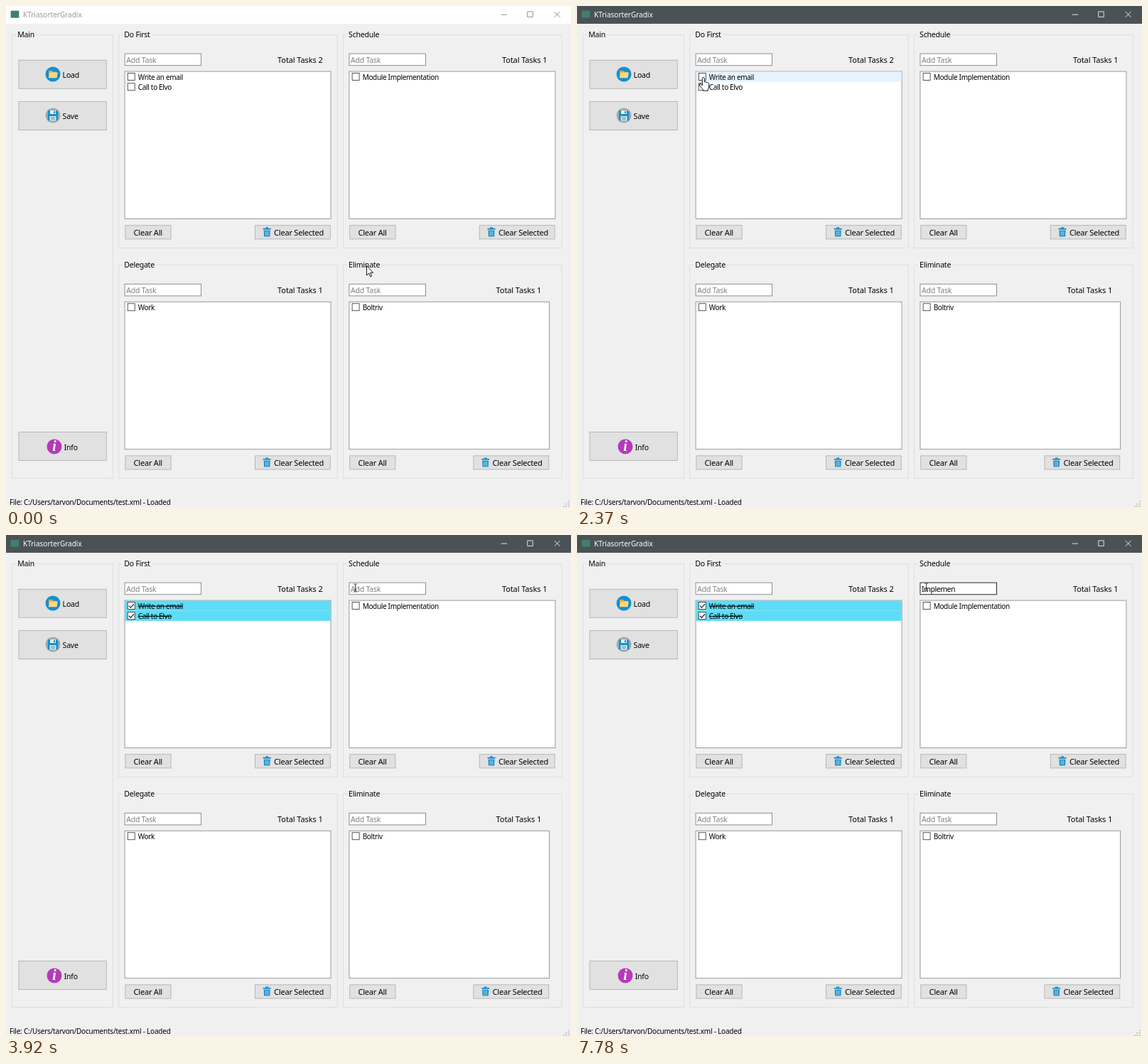
An HTML page for the animation above (8000 ms loop, 795x705 px).

```html
<!DOCTYPE html>
<html lang="en">
<head>
<meta charset="utf-8">
<title>Task board</title>
<style>
  html, body { margin: 0; width: 795px; height: 705px; overflow: hidden; background: #f0f0f0; }
  svg { display: block; }
  text { font: 12.6px "Noto Sans", "Open Sans", sans-serif; letter-spacing: -.24px; fill: #000; white-space: pre; }
  .item { font-size: 12px; letter-spacing: -.4px; }
  .total { font-size: 13.2px; letter-spacing: -.12px; }
  .button { font-size: 13.2px; letter-spacing: -.26px; }
  .status { font-size: 12px; letter-spacing: -.26px; }
  .caption { font-size: 12px; letter-spacing: 0; }
  .hint { fill: #7f7f7f; }
  .typed { letter-spacing: -.54px; }
  .mark { font: italic bold 20px "Liberation Serif", serif; fill: #fff; text-anchor: middle; }
</style>
</head>
<body>
<!-- The window is laid out in its own pixels and shown at 5/6 size. -->
<svg id="stage" width="795" height="705" viewBox="0 0 954 846"></svg>
<script>
const LOOP = 8000;
const ZOOM = 1.2; // window pixels per stage pixel
const stage = document.getElementById('stage');

function add(tag, attrs, parent = stage) {
  const el = document.createElementNS('http://www.w3.org/2000/svg', tag);
  for (const key in attrs) el.setAttribute(key, attrs[key]);
  parent.appendChild(el);
  return el;
}
const box = (x, y, width, height, fill, stroke = 'none', parent = stage) =>
  add('rect', { x, y, width, height, fill, stroke }, parent);
// One-pixel outline from the first to the last pixel of each side
const edge = (x1, y1, x2, y2, fill, stroke) =>
  box(x1 + .5, y1 + .5, x2 - x1, y2 - y1, fill, stroke);
const line = (d, stroke, parent = stage, width = 1) =>
  add('path', { d, stroke, fill: 'none', 'stroke-width': width }, parent);
const shape = (d, fill, parent = stage) => add('path', { d, fill }, parent);
const place = (x, y) => `translate(${x} ${y}) scale(${ZOOM})`;
const icon = (x = 0, y = 0) => add('g', { transform: place(x, y) });
function label(str, x, y, cls = '', parent = stage) {
  const el = add('text', { x, y, class: cls }, parent);
  el.textContent = str;
  return el;
}
const show = (el, on) => el.setAttribute('visibility', on ? 'visible' : 'hidden');

// Title bar
const bar = box(0, 0, 954, 30, '#fff');
box(8, 8, 14, 12, '#3f7f6c');
const caption = label('KTriasorterGradix', 28.8, 19.2, 'caption');
const controls = line('M836 14.5H846M880.5 9.5H889.5V18.5H880.5ZM926 9.5L935.5 19M935.5 9.5L926 19', '#777');

// Widgets
function frame(title, x, y, w, h, gap) {
  edge(x, y, x + w, y + h, 'none', '#dcdcdc');
  box(x + 7, y - 2, gap, 6, '#f0f0f0');
  label(title, x + 9.5, y + 5);
}
const button = (x1, y1, x2, y2) => edge(x1, y1, x2, y2, '#e1e1e1', '#adadad');

function trash(x, y) {
  const g = icon(x, y);
  shape('M0 2H3.6V.4H7.4V2H11V3.8H0Z', '#1590cc', g);
  shape('M1 4.8H10L9.6 13.6H1.4Z', '#1590cc', g);
  line('M3.6 6V12.4M5.5 6V12.4M7.4 6V12.4', '#cfdde5', g, .8);
}

function row(str, x, y) {
  const back = box(x + 1, y, 347, 17, 'none');
  edge(x + 5, y + 2, x + 17, y + 14, '#fff', '#333');
  const tick = line(`M${x + 7.5} ${y + 8.5}l3 3.2l5.5 -6.2`, '#222', stage, 1.4);
  const text = label(str, x + 23, y + 13.7, 'item');
  show(tick, false);
  return (hover, done) => {
    back.setAttribute('fill', done ? '#5cdcf6' : hover ? '#e5f3ff' : 'none');
    text.setAttribute('text-decoration', done ? 'line-through' : 'none');
    show(tick, done);
  };
}

function panel(title, x, y, gap, tasks, inset = 0) {
  frame(title, x, y, 369, 360, gap);
  const left = x + 10;
  const right = x + 358 - inset;
  const field = edge(left, y + 32, left + 129, y + 52, '#fff', '#7a7a7a');
  const hint = label('Add Task', left + 3, y + 48, 'hint');
  label('Total Tasks ' + tasks.length, right - 89.5, y + 48, 'total');
  edge(left, y + 62, right, y + 311, '#fff', '#828790');
  const rows = tasks.map((task, i) => row(task, left, y + 63 + i * 17));
  button(left + 1, y + 322, left + 78, y + 345);
  label('Clear All', left + 15.5, y + 339.5, 'button');
  button(right - 128, y + 322, right - 1, y + 345);
  trash(right - 114, y + 325);
  label('Clear Selected', right - 95.5, y + 339.5, 'button');
  return { field, hint, rows };
}

// Sidebar
frame('Main', 10, 48, 170, 749, 32);
[91, 161, 719].forEach(y => button(21, y, 169, y + 48));
label('Load', 95.5, 121);
label('Save', 95.5, 191);
label('Info', 98, 749.5);

const load = icon(79.2, 115.2);
add('circle', { r: 10.5, fill: '#1290d4' }, load);
shape('M-6 -5H-1L.5 -3.2H5V5H-6Z', '#e9a63a', load);
shape('M-4.5 -2.5H6.8L5.5 5.3H-6Z', '#ffd880', load);

const save = icon(79.2, 184.8);
add('circle', { r: 10.5, fill: '#a3aaae' }, save);
shape('M-7 -7H5L7.2 -4.8V7.3H-7Z', '#168fc9', save);
box(-4, -7, 8, 5, '#e9f0f3', 'none', save);
box(1, -6.2, 1.8, 3.4, '#168fc9', 'none', save);
box(-4.5, 1, 9, 6.3, '#e4eef2', 'none', save);
line('M-3 3H3M-3 5.2H3', '#2f8aa6', save);

const info = icon(81.6, 744);
add('circle', { r: 10.5, fill: '#b53abb' }, info);
label('i', 0, 6.4, 'mark', info);

// Quadrants
const first = panel('Do First', 190, 48, 49, ['Write an email', 'Call to Elvo']);
const later = panel('Schedule', 569, 48, 57, ['Module Implementation']);
panel('Delegate', 190, 437, 55, ['Work']);
panel('Eliminate', 569, 437, 57, ['Boltriv'], 10);

// Status bar
label('File: C:/Users/tarvon/Documents/test.xml - Loaded', 6, 842.4, 'status');
for (let i = 0; i < 3; i++)
  for (let j = 0; j <= i; j++) box(949 - j * 4, 836 + i * 4, 2, 2, '#b4b4b4');

// Typing
const typed = label('', 582, 96, 'typed');
const caret = box(582, 83, 1, 15, '#000');

// Pointers
const pointers = { arrow: icon(), hand: icon(), beam: icon() };
const outline = (d, parent) =>
  add('path', { d, fill: '#fff', stroke: '#000', 'stroke-width': .9, 'stroke-linejoin': 'round' }, parent);
outline('M.5 .5V14L3.6 11L5.6 15.8L7.6 15L5.6 10.3H9.6Z', pointers.arrow);
outline('M-1.7 12V1.7Q-1.7 .4 -.2 .4T1.3 1.7V7Q3 6 4 7.5Q5.6 6.8 6.3 8.2Q7.6 7.8 7.6 9.7V13' +
  'Q7.6 15 6.3 17V19.2H-.8V17.5Q-3 15.5 -5.8 11Q-5.6 9 -3.8 9.8Z', pointers.hand);
line('M-2.5 -5.5H-.8L0 -5L.8 -5.5H2.5M0 -5V5M-2.5 5.5H-.8L0 5L.8 5.5H2.5', '#333', pointers.beam);

// time, pointer, x and y on the stage, hovered row
const moves = [
  [0, 'arrow', 507, 365, 0],
  [110, 'arrow', 341, 306, 0],
  [300, 'hand', 276, 222, 0],
  [390, 'hand', 215, 140, 0],
  [590, 'hand', 203, 128, 0],
  [690, 'hand', 194, 119, 2],
  [780, 'hand', 187, 112, 2],
  [880, 'hand', 183, 107, 2],
  [970, 'hand', 180, 103, 1],
  [1070, 'hand', 179, 101, 1],
  [1170, 'hand', 178, 100, 1],
  [2560, 'hand', 178, 107, 2],
  [2650, 'hand', 178, 116, 2],
  [3250, 'hand', 205, 117, 0],
  [3340, 'hand', 310, 118, 0],
  [3440, 'hand', 420, 114, 0],
  [3530, 'arrow', 478, 110, 0],
  [3630, 'hand', 489, 103, 3],
  [3720, 'hand', 491, 96, 3],
  [3920, 'beam', 491.5, 74.5, 0],
  [4010, 'beam', 491.5, 73.5, 0]
];

// time, letters typed, caret x (0 when hidden)
const keys = [
  [0, 0, 0],
  [4110, 0, 582],
  [4600, 0, 0],
  [5100, 1, 585],
  [5400, 2, 597],
  [5600, 3, 604],
  [6200, 3, 0],
  [6390, 4, 606],
  [6480, 5, 613],
  [6680, 7, 631],
  [7180, 8, 639],
  [7780, 8, 0]
];

const at = (steps, t) => steps.filter(step => step[0] <= t).pop();

function draw(t) {
  const [, kind, x, y, hover] = at(moves, t);
  for (const name in pointers) show(pointers[name], name === kind);
  pointers[kind].setAttribute('transform', place(x * ZOOM, y * ZOOM));

  const active = t >= 2370;
  bar.setAttribute('fill', active ? '#4a5256' : '#fff');
  caption.style.fill = active ? '#fff' : '#999';
  controls.setAttribute('stroke', active ? '#fff' : '#777');

  first.rows[0](hover === 1, t >= 2560);
  first.rows[1](hover === 2, t >= 3050);
  later.rows[0](hover === 3, false);

  const [, count, caretX] = at(keys, t);
  later.field.setAttribute('stroke', t >= 4110 ? '#000' : '#7a7a7a');
  show(later.hint, count === 0);
  typed.textContent = 'Implemen'.slice(0, count);
  show(caret, caretX > 0);
  caret.setAttribute('x', caretX);
}

const start = performance.now();
function tick() {
  draw((performance.now() - start) % LOOP);
  requestAnimationFrame(tick);
}
tick();
</script>
</body>
</html>
```
